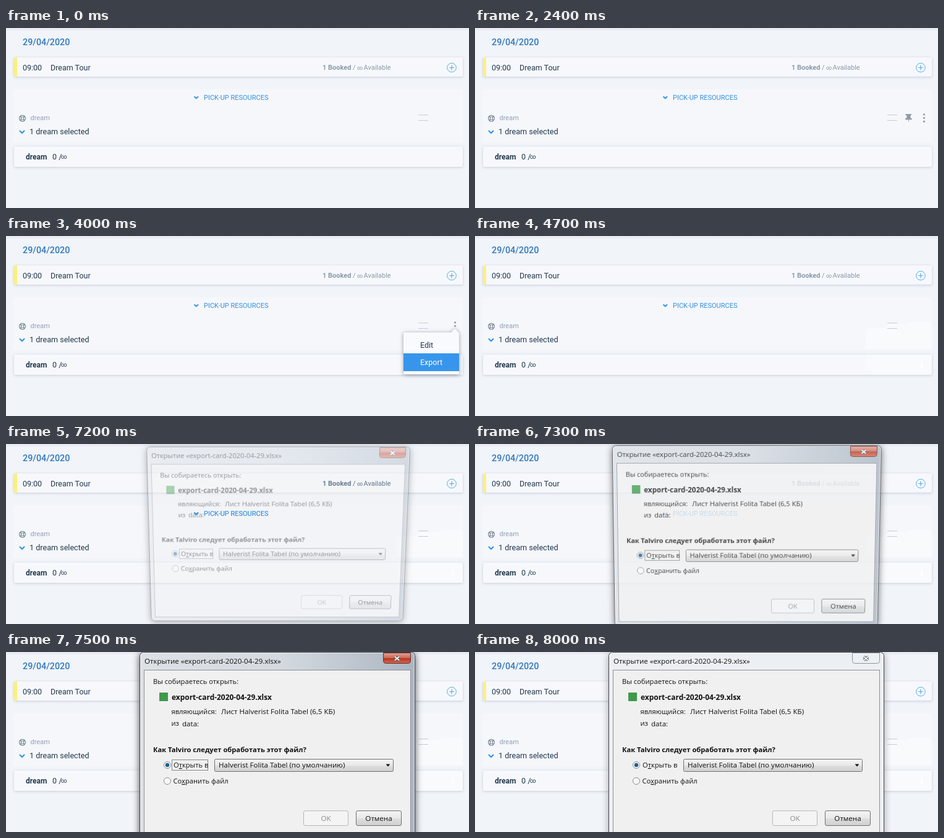
An HTML page for the animation above (8.2 s loop, 749 by 293 pixels).

```html
<!DOCTYPE html>
<html lang="en">
<head>
<meta charset="utf-8">
<title>Export a card</title>
<style>
  html, body { margin: 0; width: 100%; height: 100%; overflow: hidden; background: #f1f4f9; }
  svg { position: absolute; left: 0; top: 0; width: 749px; height: 293px; overflow: visible; }
  #page { font: 12.5px Roboto, sans-serif; color: #8b99a9; }
  #ghost { font: 11px Roboto, sans-serif; color: #75869a; }
  #dialog { font: 11.2px "Open Sans", "Noto Sans", sans-serif; transform-origin: 0 0; fill: #111; }
  .row { fill: #f6f8fc; filter: drop-shadow(0 1px 2px rgba(70, 90, 120, .25)); }
  .small { font-size: 11px; }
  .bold { font-weight: 700; }
  .wide { font-size: 11.6px; }
  .chevron { fill: none; stroke: #3290e6; stroke-width: 2; }
  .line { fill: none; stroke: #c6ccd5; }
  .menu { fill: #f9fafe; filter: drop-shadow(0 1px 3px rgba(50, 60, 80, .5)); }
  .u { text-decoration: underline; }
</style>
</head>
<body>
<svg id="page">
  <defs>
    <linearGradient id="top" x2="0" y2="1">
      <stop stop-color="#e3e7ee"/><stop offset="1" stop-color="#f1f4f9"/>
    </linearGradient>
  </defs>
  <rect width="749" height="293" fill="#f1f4f9"/>
  <rect width="749" height="5" fill="url(#top)"/>
  <text x="27" y="28" font-size="14.3" font-weight="500" fill="#2f78bd">29/04/2020</text>

  <rect class="row" x="13" y="48" width="726" height="31" rx="2"/>
  <path d="M18 48h-3q-2 0-2 2v27q0 2 2 2h3z" fill="#fdf07c"/>
  <g fill="#25394e">
    <text x="27" y="69">09:00</text>
    <text x="72" y="69">Dream Tour</text>
  </g>
  <g id="booked" class="small" fill="currentColor">
    <text x="512" y="68" class="bold">1 Booked</text>
    <text x="561" y="68">/</text>
    <text x="568" y="68" style="font-size:9.5px">∞</text>
    <text x="578.500" y="68">Available</text>
  </g>
  <g fill="none" stroke="#5aabe6">
    <circle cx="721" cy="64.500" r="7.300"/>
    <path d="M717 64.500h8M721 60.500v8" stroke-width="1.2"/>
  </g>

  <rect x="12" y="100" width="727" height="86" rx="2" fill="#f5f7fb"/>
  <g id="pickup" class="small">
    <path class="chevron" d="M304.500 111.500l3.300 3 3.300-3"/>
    <text x="320" y="117" fill="#338fe0">PICK-UP RESOURCES</text>
  </g>
  <g fill="none" stroke="#738393">
    <circle cx="26.500" cy="147" r="4.900" stroke-width="1.2"/>
    <circle cx="26.500" cy="147" r="2.200"/>
    <path d="M23 143.500l2 2M28 148.500l2 2M30 143.500l-2 2M25 148.500l-2 2" stroke-width="1.5"/>
  </g>
  <text x="39.500" y="150" class="small" fill="#92a0af">dream</text>
  <path class="chevron" d="M22 167l4 4 4-4" stroke-width="2.4"/>
  <text x="38" y="173" fill="#25394e" style="font-size:12.6px">1 dream selected</text>

  <rect class="row" x="13" y="193" width="726" height="33" rx="2"/>
  <g fill="#25394e">
    <text x="32" y="214" class="bold" style="font-size:12px">dream</text>
    <text x="75" y="214">0 /</text>
    <text x="89" y="213" style="font-size:10px">∞</text>
  </g>

  <g id="patch" fill="#fafbfd">
    <path d="M632 184v-30q1-4 9-4h23q3-6 11-6h22q5-5 16-4h21q5 0 5 6v38z" opacity=".75"/>
    <path d="M632 194h105q2 0 2 2v28q0 2-2 2h-93v-6h-12z" opacity=".75"/>
  </g>
  <path class="line" d="M667 141.500h16M667 150.500h16"/>
  <path id="pin" d="M696.500 140h9.500v2h-1.500v4q2.500 1 2.500 3.200h-5l-.6 4.800-.6-4.800h-5q0-2.200 2.500-3.200v-4h-1.800z" fill="#8f9ba8"/>
  <g id="dots" fill="#8f9ba8">
    <circle cx="726.500" cy="140.800" r="1.600"/>
    <circle cx="726.500" cy="146.500" r="1.600"/>
    <circle cx="726.500" cy="152.200" r="1.600"/>
  </g>
  <g id="menu">
    <path class="menu" d="M645 157h75l6.500-7 5 7q1.500 0 1.500 2v64q0 2-2 2h-86q-2 0-2-2v-64q0-2 2-2z"/>
    <rect id="editBar" x="643" y="163" width="90" height="28" fill="#3796ec"/>
    <rect id="exportBar" x="643" y="191" width="90" height="29" fill="#3796ec"/>
    <text id="edit" x="670" y="182">Edit</text>
    <text id="export" x="670" y="210">Export</text>
  </g>
  <g id="whiteDots" fill="#fff">
    <circle cx="722.700" cy="205.800" r="1.700"/>
    <circle cx="722.700" cy="209.700" r="1.700"/>
    <circle cx="722.700" cy="213.500" r="1.700"/>
  </g>
</svg>

<svg id="dialog">
  <defs>
    <linearGradient id="glass" x2="1" y2="0">
      <stop stop-color="#dde1e6"/><stop offset=".5" stop-color="#d5dae0"/><stop offset="1" stop-color="#abb6c2"/>
    </linearGradient>
    <linearGradient id="red" x2="0" y2="1">
      <stop stop-color="#dfa294"/><stop offset=".48" stop-color="#cc6a58"/>
      <stop offset=".5" stop-color="#b5331f"/><stop offset="1" stop-color="#cf6a4e"/>
    </linearGradient>
    <linearGradient id="button" x2="0" y2="1">
      <stop stop-color="#f4f4f4"/><stop offset=".5" stop-color="#e9e9e9"/>
      <stop offset=".52" stop-color="#dedede"/><stop offset="1" stop-color="#d0d0d0"/>
    </linearGradient>
  </defs>
  <rect id="frame" x="216.500" y=".5" width="445" height="304" rx="6" stroke="#3c4045"/>
  <rect x="217.500" y="1.500" width="443" height="302" rx="5" fill="none" stroke="#fff" opacity=".7"/>
  <rect x="223.500" y="29.500" width="431" height="268" fill="#f0f0f0" stroke="#8b9097"/>
  <text x="224" y="19" class="wide">Открытие «export-card-2020-04-29.xlsx»</text>
  <path id="close" d="M610.500 1.500h44v13q0 4-4 4h-36q-4 0-4-4z"/>
  <g fill="none">
    <path d="M629 7.500l7 6M636 7.500l-7 6" stroke="#50555e" stroke-width="4"/>
    <path d="M629 7.500l7 6M636 7.500l-7 6" stroke="#fff" stroke-width="2"/>
  </g>

  <text x="238" y="52">Вы собираетесь открыть:</text>
  <rect x="248" y="66" width="14" height="14" fill="#3f9a4c"/>
  <text x="268" y="78" class="bold" style="font-size:11.950px">export-card-2020-04-29.xlsx</text>
  <text x="267.500" y="101">являющийся:</text>
  <text x="348" y="101" class="wide">Лист Halverist Folita Tabel (6,5 КБ)</text>
  <text x="267.500" y="120">из</text>
  <text x="285" y="120.500" class="wide">data:</text>

  <text x="238" y="163" class="bold">Как Talviro следует обработать этот файл?</text>
  <g fill="#f8f8f8" stroke="#8a8d91">
    <circle cx="261" cy="184" r="5.500"/>
    <circle cx="261" cy="210" r="5.500"/>
  </g>
  <circle cx="261" cy="184" r="3.200" fill="#1d5f93"/>
  <text x="271" y="188">О<tspan class="u">т</tspan>крыть в</text>
  <rect id="focus" x="268.500" y="175.500" width="58" height="17" fill="none" stroke="#222" stroke-dasharray="1 1"/>
  <text x="270.500" y="214">Со<tspan class="u">х</tspan>ранить файл</text>
  <rect x="337.500" y="174.500" width="289" height="20" rx="2" fill="url(#button)" stroke="#707070"/>
  <text x="344" y="188" class="wide">Halverist Folita Tabel (по умолчанию)</text>
  <path d="M614.500 182.500h7l-3.500 4z"/>

  <g text-anchor="middle">
    <rect x="481.500" y="258.500" width="72" height="24" rx="2.500" fill="#f4f4f4" stroke="#b4b8bc"/>
    <text x="517.500" y="275" class="wide" fill="#8b8b8b">OK</text>
    <rect x="566.500" y="258.500" width="73" height="24" rx="2.500" fill="url(#button)" stroke="#707070"/>
    <text x="603" y="275" class="wide">Отмена</text>
  </g>
</svg>

<svg id="ghost">
  <use href="#booked"/>
  <use href="#pickup"/>
</svg>

<script>
const LOOP = 8200;
const el = id => document.getElementById(id);
const fade = (id, value) => { el(id).style.opacity = Number(value); };
const fill = (id, color) => { el(id).style.fill = color; };

// Opening steps of the dialog: remaining tilt and opacity, 100 ms each.
const opening = [[1, .43], [.5, .78], [.18, .98], [0, 1]];

function tilt(r) {
  const mix = (rest, full) => rest + (full - rest) * r;
  return `matrix3d(1,0,0,0, ${mix(0, .0652)},${mix(1, 1.02)},0,${mix(0, .000165)},
    0,0,1,0, ${mix(0, 21.3)},${mix(0, 4.57)},0,${mix(1, 1.0448)})`;
}

function drawMenu(t) {
  const toExport = t < 3900 ? 0 : t < 4000 ? .6 : 1;
  const onEdit = t < 3800 ? 0 : 1 - toExport;
  fade('dots', t >= 2400 && t < 4400);
  fade('pin', t >= 2400 && t < 3800 ? 1 : t >= 3800 && t < 4000 ? .5 * (1 - toExport) : 0);
  fade('menu', t >= 3300 && t < 4400);
  fade('editBar', onEdit);
  fade('exportBar', toExport);
  fill('edit', onEdit > .3 ? '#fff' : '#25394e');
  fill('export', toExport > .3 ? '#fff' : '#25394e');
  fade('patch', t >= 4400);
  fade('whiteDots', t >= 4700);
}

function drawDialog(t) {
  const step = Math.min(3, Math.floor((t - 7200) / 100));
  const active = t < 8000;
  fade('ghost', step === 0);
  fade('dialog', step < 0 ? 0 : opening[step][1]);
  if (step < 0) return;
  el('dialog').style.transform = tilt(opening[step][0]);
  fill('frame', active ? 'url(#glass)' : '#eceff3');
  el('frame').style.filter = `drop-shadow(0 2px 6px rgba(0,0,0,${active ? .7 : .35}))`;
  fill('close', active ? 'url(#red)' : '#eef1f4');
  el('close').style.stroke = active ? '#6b2a22' : '#8d949c';
  fade('focus', active);
}

function draw() {
  const t = performance.now() % LOOP;
  drawMenu(t);
  drawDialog(t);
  requestAnimationFrame(draw);
}
draw();
</script>
</body>
</html>
```
